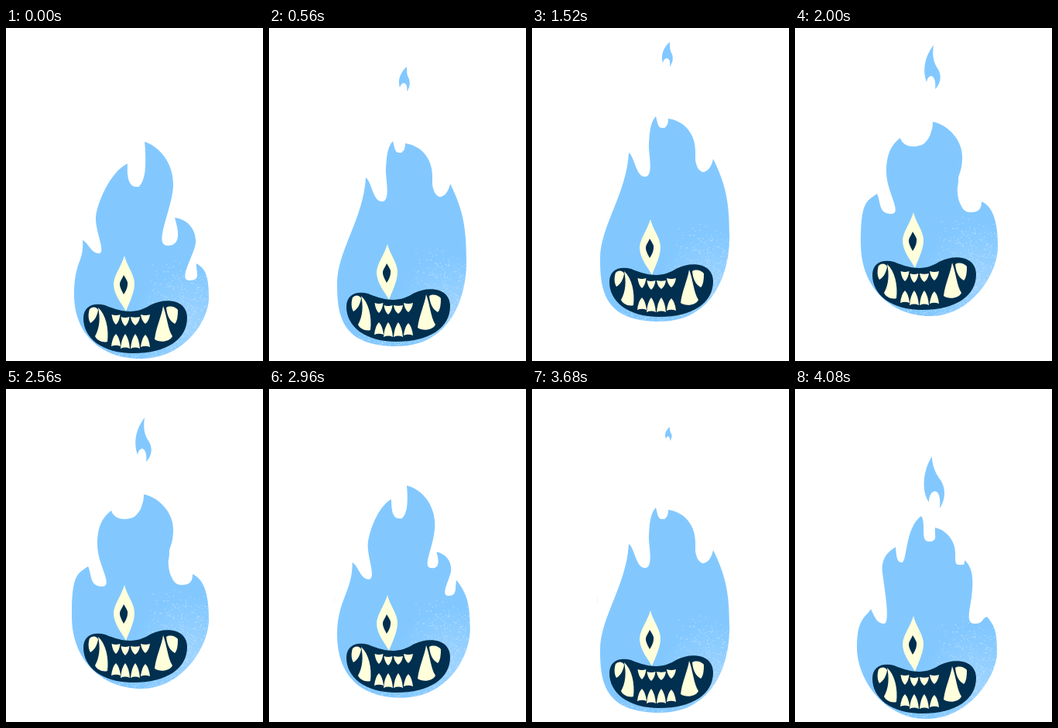
Recreate the animation shown at these times as an HTML page. Size 332 px wide and 430 px high, loop 4160 ms.

```html
<!DOCTYPE html>
<html lang="en">
<head>
<meta charset="utf-8">
<title>Flame monster</title>
<style>
  html, body { margin: 0; width: 100%; height: 100%; overflow: hidden; background: #fff; }
  svg { display: block; width: 332px; height: 430px; }
  .flame { fill: #82c8ff; }
  .ink { fill: #002f4f; }
  .cream { fill: #ffffdc; }
</style>
</head>
<body>
<svg viewBox="0 0 332 430">
  <defs>
    <clipPath id="inside"><path id="clip"/></clipPath>
    <radialGradient id="glow" gradientUnits="userSpaceOnUse" cx="238" cy="385" r="75">
      <stop offset="0" stop-color="#b5ddff" stop-opacity=".55"/>
      <stop offset="1" stop-color="#b5ddff" stop-opacity="0"/>
    </radialGradient>
  </defs>
  <g id="monster">
    <path id="puff" class="flame"/>
    <path id="body" class="flame"/>
    <g clip-path="url(#inside)">
      <rect x="150" y="300" width="120" height="130" fill="url(#glow)"/>
      <path id="specks" stroke="#b9dfff" stroke-width="1.1" fill="none"/>
    </g>
    <path class="cream" d="M153 294C156 307 166 318 166 330C166 342 159 355 155 366C150 356 139 345 139 330C140 318 149 308 153 294Z"/>
    <path class="ink" d="M152 319C155 324 158 328 157 331C157 336 154 341 152 344C150 340 147 335 147 331C147 327 150 324 152 319Z"/>
    <path class="ink" d="M100 375C100 359 113 354 128 358C156 370 172 367 186 358C208 347 234 352 234 374C234 402 208 420 164 420C124 420 100 400 100 375Z"/>
    <g class="cream">
      <path d="M108 363C112 359 117 360 119 364C118 372 114 378 109 381C106 376 106 369 108 363Z"/>
      <path d="M119 361C129 370 133 388 131 405C125 407 117 403 115 398C121 388 122 374 119 361Z"/>
      <path d="M203 359C208 372 209 389 215 398C212 405 199 407 192 402C194 386 201 372 203 359Z"/>
      <path d="M207 361C212 358 219 360 222 364C222 373 221 379 218 382C211 378 208 371 207 361Z"/>
      <path id="teeth"/>
    </g>
  </g>
</svg>
<script>
const STEP = 80, COUNT = 52;
const $ = id => document.getElementById(id);

// Bodies share one structure, so any two can be blended.
const bodies = {
  tall: `M99 274 C107 278 110 291 120 291 S115 262 116 245 S134 186 157 175
    C156 190 158 205 168 205 S171 205 172 204 C176 202 179 190 179.5 185 S181 165 179 147
    C196 152 216 172 216 202 S189 281 209 281 S221 256 218 245
    C236 247 246 262 245 277 S221 326 237 326 S245 314 246 304
    C257 311 262 318 262 348 S230 427 174 427 S88 390 88 345 S101 303 99 274Z`,
  spiky: `M98 285 C103 296 106 304 115 304 S115 256 113 238 S120 211 130 205
    C131 215 131 225 138 225 S142 180 163 165 C170 174 161 198 173 198 S180 190 181 180
    C196 183 207 198 207 212 S207 228 213 228 S219 228 219 222
    C232 233 230 254 228 270 S220 304 232 304 S240 298 248 295
    C257 306 261 312 261 341 S226 427 170 427 S80 374 80 335 S92 296 98 285Z`,
  waist: `M106 270 C111 281 108 296 124 296 S118 268 118 242 S126 206 136 198
    C138 205 145 209 152 209 S165 207 167 205 C171 201 174 197 175 193 S178 186 178 177
    C200 182 216 202 216 222 S211 244 211 252 S209 262 210 268
    C210 272 211 278 213 282 S217 294 227 294 S241 290 241 280
    C254 286 262 302 262 338 S227 428 175 428 S85 390 85 335 S92 280 106 270Z`,
  broad: `M125 208 C133 214 134 239 146 239 S150 208 151 196 S152 170 160 161
    C162 168 162 176 168 176 S171 176 172 175 C175 173 175 171 175.5 169 S176 167 176 164
    C198 167 211 185 211 206 S211 213 211 216 S212 222 213 225
    C214 228 215 229 216 230 S219 233 221 233 S231 231 234 216
    C252 252 255 276 255 318 S236 426 165 426 S88 387 88 345 S122 262 125 208Z`
};
bodies.last = bodies.broad;

const puffs = {
  tall: "M177 148C164 168 164 195 173 207C173 198 177 193 181 193C187 194 188 204 187 215C197 200 193 184 186 176C180 167 177 158 177 148Z",
  spiky: "M177 88C164 108 164 135 173 147C173 138 177 133 181 133C187 134 188 144 187 155C197 140 193 124 186 116C180 107 177 98 177 88Z",
  waist: "M179 78C168 92 164 110 170 126C171 120 174 118 176 118C181 119 182 128 181 135C190 126 189 115 184 108C179 100 177 92 179 78Z",
  broad: "M178 65C169 73 166 83 169 92C170 88 172 86 174 86C178 87 179 91 178 97C183 90 182 85 181 81C178 76 178 71 178 65Z",
  last: "M178 57C172 62 171 67 173 72C174 70 175 69 176 69C178 70 178 72 178 75C181 71 181 68 180 66C178 63 178 61 178 57Z"
};

// [step, pose]
const poses = [
  [0, "tall"], [3, "spiky"], [5, "waist"], [7, "broad"], [8, "last"],
  [11, "tall"], [14, "spiky"], [17, "waist"], [19, "broad"], [20, "last"],
  [22, "tall"], [23, "spiky"], [25, "waist"], [32, "waist"], [34, "broad"], [35, "last"],
  [38, "tall"], [40, "spiky"], [42, "waist"], [45, "broad"], [46, "last"],
  [49, "tall"], [51, "spiky"], [52, "tall"]
];

// [step, vertical offset]
const bob = [
  [0, 0], [7, -15], [14, -33], [20, -50], [22, -55], [24, -57], [25, -56],
  [28, -51], [32, -41], [35, -33], [42, -15], [49, -3], [52, 0]
];

function span(table, n) {
  const i = table.findIndex(([at]) => at > n);
  const [from, a] = table[i - 1], [to, b] = table[i];
  return { a, b, k: (n - from) / (to - from) };
}

const mix = (a, b, k) => a + (b - a) * k;
const NUM = /[\d.]+/g;

function blend(a, b, k) {
  const ends = b.match(NUM);
  let i = 0;
  return a.replace(NUM, v => mix(+v, +ends[i++], k).toFixed(1));
}

function tooth(x, y, w, h) {
  const l = x - w / 2, r = x + w / 2, bulge = y + h * .7;
  return `M${l} ${y}Q${x - w * .4} ${bulge} ${x} ${y + h}Q${x + w * .4} ${bulge} ${r} ${y}Q${x} ${y + h * .15} ${l} ${y}Z`;
}

$("teeth").setAttribute("d", [
  [142, 370, 11, 13], [154, 373, 11, 12], [167, 373, 12, 11], [180, 370, 12, 12],
  [142, 411, 12, -16], [154, 414, 12, -19], [167, 414, 12, -19], [180, 412, 12, -16]
].map(t => tooth(...t)).join(""));

let seed = 7;
const rand = () => (seed = seed * 16807 % 2147483647) / 2147483647;
let dots = "";
for (let i = 0; i < 420; i++) {
  const x = 230 + (rand() + rand() - 1) * 50;
  const y = 365 + (rand() + rand() - 1) * 65;
  dots += `M${x.toFixed(1)} ${y.toFixed(1)}h1.2`;
}
for (let i = 0; i < 140; i++) {
  dots += `M${(110 + rand() * 120).toFixed(1)} ${(412 + rand() * 15).toFixed(1)}h1.4`;
}
$("specks").setAttribute("d", dots);

let shown = -1;
function draw(n) {
  const { a, b, k } = span(poses, n);
  const body = blend(bodies[a], bodies[b], k);
  $("body").setAttribute("d", body);
  $("clip").setAttribute("d", body);
  $("puff").setAttribute("d", blend(puffs[a], puffs[b], k));
  const hidden = (a === "tall" && k === 0) || (b === "tall" && k > 0);
  $("puff").style.visibility = hidden ? "hidden" : "visible";
  const y = span(bob, n);
  $("monster").setAttribute("transform", `translate(0 ${Math.round(mix(y.a, y.b, y.k))})`);
}

const start = performance.now();
function tick() {
  const n = Math.floor((performance.now() - start) / STEP) % COUNT;
  if (n !== shown) draw(shown = n);
  requestAnimationFrame(tick);
}
tick();
</script>
</body>
</html>
```
